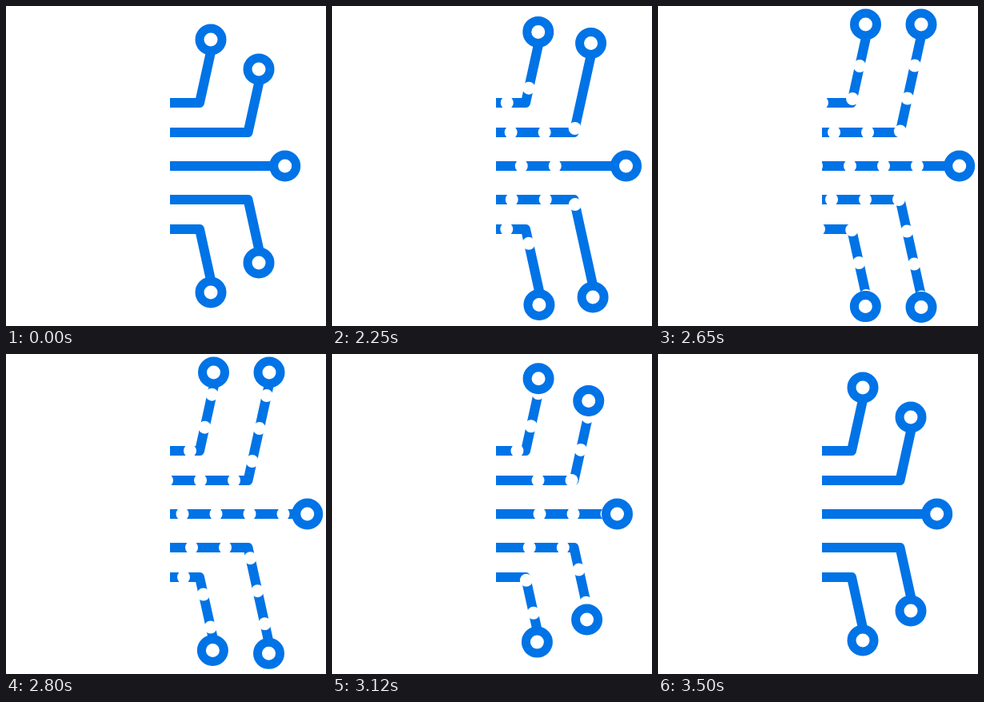
An HTML page with a canvas that plays this animation: 400 by 400 pixels, repeating every 3.52 s.

```html
<!DOCTYPE html>
<html lang="en">
<head>
<meta charset="utf-8">
<title>Circuit pulse</title>
<style>
  html, body { margin: 0; width: 100%; height: 100%; overflow: hidden; background: #fff; }
  canvas { display: block; width: 400px; height: 400px; }
</style>
</head>
<body>
<canvas id="stage" width="400" height="400"></canvas>
<script>
const LOOP = 3520, LEFT = 205, GAP = 42, RING = 14, SLOPE = 0.22, BLUE = '#0073e6';
const ctx = document.getElementById('stage').getContext('2d');

// bend: corner x, rest/far: node positions, out: end of outward move,
// back: start of return, dots: count, tail: place of the last dot at KEYS
const KEYS = [2000, 2020, 2450, 2650, 2950, 3300, 3500];
const traces = [
  { y: 121, bend: 242, rest: [256, 42], far: [259.5, 23], out: 2710, back: 2945,
    dots: 5, tail: [-178, -170, -62, -42, 8, 46, 117] },
  { y: 158, bend: 302.5, rest: [316, 79], far: [329, 23], out: 2650, back: 2855,
    dots: 7, tail: [-261, -251, -61, -27, 19, 88, 178] },
  { y: 200, bend: 302.5, rest: [348.7, 200], far: [376.7, 200], out: 2580, back: 2795,
    dots: 5, tail: [-177, -167, -31, -7, 38, 72, 143] },
  { y: 242, bend: 302.5, rest: [316, 321], far: [329, 376.5], out: 2500, back: 2705,
    dots: 7, tail: [-261, -251, -59, -30, 0, 86, 178] },
  { y: 279, bend: 242, rest: [256, 358], far: [259.5, 376.5], out: 2450, back: 2520,
    dots: 4, tail: [-136, -128, -21, -4, 38, 44, 117] }
];

const mix = (a, b, p) => a + (b - a) * p;
const span = (t, a, b) => Math.min(1, Math.max(0, (t - a) / (b - a)));

// cubic-bezier(.4, 0, .2, 1)
function ease(x) {
  let lo = 0, hi = 1;
  for (let i = 0; i < 20; i++) {
    const s = (lo + hi) / 2, r = 1 - s;
    if (1.2 * s * r * r + 0.6 * s * s * r + s * s * s < x) lo = s; else hi = s;
  }
  return x <= 0 ? 0 : x >= 1 ? 1 : lo * lo * (3 - 2 * lo);
}

function along(values, t) {
  let i = 0;
  while (i < KEYS.length - 2 && t >= KEYS[i + 1]) i++;
  return mix(values[i], values[i + 1], span(t, KEYS[i], KEYS[i + 1]));
}

function disc(x, y, r) {
  ctx.beginPath();
  ctx.arc(x, y, r, 0, Math.PI * 2);
}

function drawTrace(tr, t) {
  const reach = ease(span(t, 2000, tr.out)) - ease(span(t, tr.back, 3500));
  const x = mix(tr.rest[0], tr.far[0], reach);
  const y = mix(tr.rest[1], tr.far[1], reach);

  // the wire keeps its direction and stops under the ring
  const side = Math.sign(tr.rest[1] - tr.y);
  const dy = y - RING * side - tr.y;
  const dx = side ? SLOPE * Math.abs(dy) : x - RING - tr.bend;
  const flat = tr.bend - LEFT, slant = Math.hypot(dx, dy);

  ctx.strokeStyle = BLUE;
  ctx.lineWidth = 12;
  ctx.beginPath();
  ctx.moveTo(LEFT, tr.y);
  ctx.lineTo(tr.bend, tr.y);
  ctx.lineTo(tr.bend + dx, tr.y + dy);
  ctx.stroke();

  ctx.fillStyle = '#fff';
  if (t > 2000 && t < 3500) {
    const tail = along(tr.tail, t);
    for (let k = 0; k < tr.dots; k++) {
      const d = tail + k * GAP;
      if (d < -8 || d > flat + slant + RING) continue;
      const p = Math.max(0, d - flat) / slant;
      disc(LEFT + Math.min(d, flat) + dx * p, tr.y + dy * p, 8);
      ctx.fill();
    }
  }

  disc(x, y, RING);
  ctx.fill();
  ctx.lineWidth = 11;
  ctx.stroke();
}

function draw(t) {
  ctx.fillStyle = '#fff';
  ctx.fillRect(0, 0, 400, 400);
  ctx.lineJoin = 'round';
  for (const tr of traces) drawTrace(tr, t);
}

const start = performance.now();
function tick() {
  const t = (performance.now() - start) % LOOP;
  // steps alternate between 20 and 30 ms
  const base = Math.floor(t / 50) * 50;
  draw(base + (t - base >= 20 ? 20 : 0));
  requestAnimationFrame(tick);
}
tick();
</script>
</body>
</html>
```
